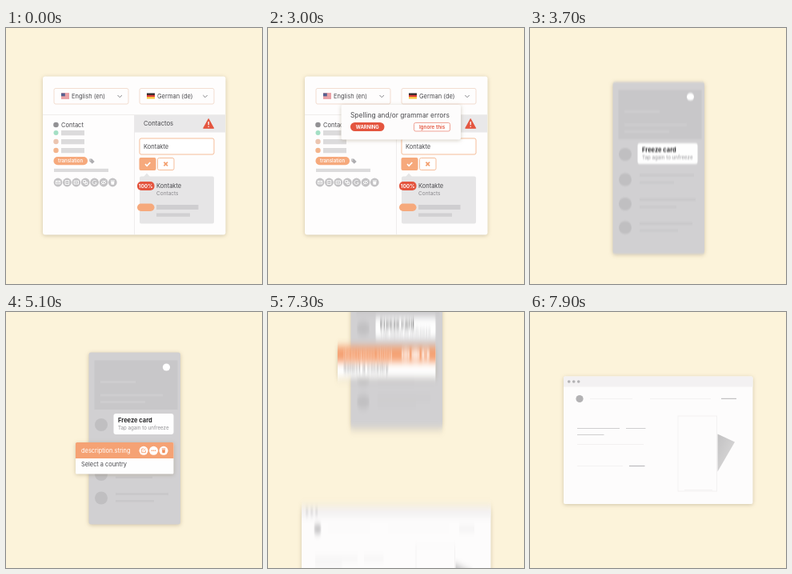
An HTML page that plays this animation: 320 by 320 pixels, repeating every 8 s.

```html
<!DOCTYPE html>
<html lang="en">
<head>
<meta charset="utf-8">
<title>Translation tool tour</title>
<style>
  html, body { margin: 0; width: 100%; height: 100%; overflow: hidden; background: #fcf3da; }
  svg { display: block; width: 100vw; height: 100vh; }
  text { font: 7.5px Inter, sans-serif; fill: #4b4b4f; }
  .shadow { filter: drop-shadow(0 1px 2.5px rgba(110, 90, 50, .3)); }
  .pop { opacity: 0; }
  .bar { fill: #dcdbdc; }
  .box { fill: #fefdfd; stroke: #f2ddd0; }
  .chev { fill: none; stroke: #77777b; stroke-width: .9; }
  .orange { fill: #f6a97c; }
  .red { fill: #e4553f; }
  .mark { fill: none; stroke: #fff; stroke-width: .9; }
  .white { fill: #fff; }
  .phone-dot { fill: #c0bfc1; }
  .phone-bar { fill: #c9c8ca; }
  .line { fill: none; stroke: #cfcecf; }
  .faint { fill: none; stroke: #f3f1f1; }
</style>
</head>
<body>
<svg viewBox="0 0 320 320">
  <defs>
    <filter id="blur" filterUnits="userSpaceOnUse" x="0" y="-40" width="320" height="400" color-interpolation-filters="sRGB">
      <feGaussianBlur id="amount" stdDeviation="0 0"/>
    </filter>
    <linearGradient id="fold" x2="1" y2="1">
      <stop stop-color="#c2c1c2"/><stop offset="1" stop-color="#dedddd"/>
    </linearGradient>
    <g id="ring"><circle r="5.4" fill="#c3c2c4"/></g>
  </defs>
  <rect width="320" height="320" fill="#fcf3da"/>

  <g id="stage"><g id="strip">
    <!-- editor -->
    <g>
      <rect class="shadow" x="46" y="60.5" width="228.5" height="198" rx="3" fill="#fefdfd"/>
      <path d="M46 108.5H274.500M160.500 108.500V258" class="line" style="stroke:#efedec"/>
      <rect x="160.500" y="109" width="113.500" height="21.500" fill="#e9e8e9"/>

      <rect class="box" x="60" y="75.500" width="93" height="19.500" rx="2"/>
      <rect x="69" y="81.500" width="10" height="7" fill="#f4e4e4"/>
      <path d="M69 82H79M69 84H79M69 86H79M69 88H79" stroke="#e0606a"/>
      <rect x="69" y="81.500" width="4.800" height="3.800" fill="#56608f"/>
      <text x="82" y="87.800">English (en)</text>
      <path class="chev" d="M139.500 84l2.700 2.700 2.700-2.700"/>

      <rect class="box" x="167" y="75.500" width="93" height="19.500" rx="2"/>
      <rect x="176" y="81.500" width="10" height="2.500" fill="#2d2929"/>
      <rect x="176" y="83.800" width="10" height="2.400" fill="#dd3a35"/>
      <rect x="176" y="86.100" width="10" height="2.400" fill="#f5c53f"/>
      <text x="189" y="87.800">German (de)</text>
      <path class="chev" d="M246.300 84l2.700 2.700 2.700-2.700"/>

      <circle cx="62.500" cy="121" r="3.300" fill="#929194"/>
      <text x="69" y="123.800">Contact</text>
      <circle cx="62.500" cy="131" r="3" fill="#a4dfc4"/>
      <circle cx="62.500" cy="142" r="3.200" fill="#ebc5b0"/>
      <circle cx="62.500" cy="153" r="3.200" fill="#f3b48c"/>
      <rect class="bar" x="69" y="128" width="29" height="6.300"/>
      <rect class="bar" x="69" y="139" width="29" height="6.300"/>
      <rect class="bar" x="69" y="150" width="29" height="6.300"/>
      <rect class="orange" x="59.500" y="161" width="42.500" height="10.300" rx="5"/>
      <text x="80.700" y="168.300" text-anchor="middle" style="font-size:6.200px;font-weight:500;fill:#fff">translation</text>
      <path d="M104.300 163.500h3l3.400 3.400-2.900 2.900-3.500-3.400z" fill="#aeadb0"/>
      <circle cx="105.700" cy="165" r=".6" class="white"/>
      <rect class="bar" x="60" y="175.800" width="68" height="4.200"/>

      <g transform="translate(65 193)"><use href="#ring"/><path class="mark" d="M-2.700-1.800H2.700V1.900H-2.700zL0 .4 2.700-1.800"/></g>
      <g transform="translate(76.400 193)"><use href="#ring"/><path class="mark" d="M-2.300-2.500H2.300V2.500H-2.300zM-1 0H1"/></g>
      <g transform="translate(87.800 193)"><use href="#ring"/><path class="mark" d="M-2.700-2H2.700V2.100H-2.700zM-1.300 0H1.300"/></g>
      <g transform="translate(99.200 193)"><use href="#ring"/><path class="mark" d="M-2.500-2.500H.5V.5H-2.500zM-.3 -.3H2.500V2.500H-.3z"/></g>
      <g transform="translate(110.600 193)"><use href="#ring"/><path class="mark" d="M2-1.700A2.600 2.600 0 1 0 2.600.6H.5"/></g>
      <g transform="translate(122 193)"><use href="#ring"/><path class="mark" d="M-3 0Q0-3.600 3 0Q0 3.600-3 0M-2.500 2.500L2.500-2.500"/></g>
      <g transform="translate(133.300 193)"><use href="#ring"/><path class="white" d="M-2.200-1.200H2.200L1.700 2.800H-1.700zM-2.600-2.600H2.600V-1.800H-2.600z"/></g>

      <text x="172" y="121.800" style="font-size:7.700px">Contactos</text>
      <path class="red" d="M253.200 113.500L259.700 125.300H246.700z" stroke="#e4553f" stroke-linejoin="round"/>
      <path d="M253.200 117v4.300M253.200 122.700v1.300" stroke="#fff" stroke-width="1.300"/>

      <rect x="167" y="138" width="93" height="20" rx="2" fill="#fff" stroke="#f5bd99"/>
      <text x="172" y="150.800">Kontakte</text>
      <rect class="orange" x="166.500" y="162" width="21" height="16" rx="2"/>
      <path class="mark" d="M174 170.200l2.200 2.200 4.100-4.400" style="stroke-width:1.700"/>
      <rect x="189.500" y="162.500" width="20.500" height="15" rx="2" fill="#fff" stroke="#f5bd99"/>
      <path d="M197.400 167.700l4.600 4.600M202 167.700l-4.600 4.600" stroke="#f3a06f" stroke-width="1.700"/>

      <path d="M172 186l4-4.500 4 4.500z" fill="#e6e5e6"/>
      <rect x="167" y="185.500" width="93" height="59" rx="2" fill="#e6e5e6"/>
      <rect class="red" x="164" y="192" width="21.500" height="11" rx="5"/>
      <text x="174.700" y="199.900" text-anchor="middle" style="font-size:6.600px;font-weight:600;fill:#fff">100%</text>
      <text x="188" y="199.800">Kontakte</text>
      <text x="188" y="209.300" style="font-size:6.500px;fill:#89888c">Contacts</text>
      <rect class="orange" x="164" y="219.500" width="21.500" height="9.500" rx="4.700"/>
      <rect x="188" y="221" width="52.500" height="6" fill="#cfced0"/>
      <rect x="188" y="231.500" width="42" height="4.300" fill="#d1d0d2"/>

      <g class="pop">
        <rect class="shadow" x="91.500" y="96" width="149.500" height="43.500" rx="2" fill="#fdfcfc"/>
        <text x="103" y="112.500" style="font-size:8.400px">Spelling and/or grammar errors</text>
        <rect class="red" x="103" y="118" width="42.500" height="11" rx="5.500"/>
        <text x="124.200" y="125.700" text-anchor="middle" style="font-size:5.900px;font-weight:700;fill:#fff">WARNING</text>
        <rect x="182.500" y="118.500" width="45" height="10.500" rx="2" fill="#fff" stroke="#eb8b7a" stroke-width=".8"/>
        <text x="205" y="126" text-anchor="middle" style="font-size:6.300px;font-weight:600;fill:#e4553f">Ignore this</text>
      </g>
    </g>

    <!-- phone -->
    <g transform="translate(0 300)">
      <rect class="shadow" x="103.500" y="50.500" width="114.500" height="215" rx="3" fill="#d1d0d2"/>
      <rect x="110.500" y="60.500" width="104" height="61.500" fill="#c8c7c9"/>
      <path d="M118 87.500H162M118 104H196M118 112.500H174" stroke="#cecdcf" stroke-width="3"/>
      <circle class="white" cx="200.500" cy="69" r="4.600"/>
      <circle class="phone-dot" cx="119" cy="141" r="8"/>
      <circle class="phone-dot" cx="119" cy="172.500" r="8"/>
      <circle class="phone-dot" cx="119" cy="203" r="8"/>
      <circle class="phone-dot" cx="119" cy="232.500" r="8"/>
      <rect class="phone-bar" x="137" y="165.500" width="68" height="3"/>
      <rect class="phone-bar" x="137" y="175" width="43" height="2.500"/>
      <rect class="phone-bar" x="137" y="196" width="70" height="3"/>
      <rect class="phone-bar" x="137" y="205.500" width="46" height="2.500"/>
      <rect class="phone-bar" x="137" y="226" width="66" height="3"/>
      <rect class="phone-bar" x="137" y="235" width="48" height="2.500"/>
      <rect x="134.500" y="127" width="75" height="26" rx="3" fill="#fefefe"/>
      <text x="140" y="138.300" style="font-weight:700;fill:#252527">Freeze card</text>
      <text x="140" y="147.300" style="font-size:6.200px;fill:#919094">Tap again to unfreeze</text>

      <g class="pop">
        <rect class="shadow" x="87" y="163" width="122.500" height="39.500" rx="1.500" fill="#fefefe"/>
        <path d="M87 183V164.500q0-1.500 1.500-1.500H208q1.500 0 1.500 1.500V183z" fill="#f5a274"/>
        <text x="94" y="175.700" style="font-size:7.450px;fill:#fff">description.string</text>
        <g class="white">
          <circle cx="172" cy="173.300" r="5.500"/>
          <circle cx="184.500" cy="173.300" r="5.500"/>
          <circle cx="197" cy="173.300" r="5.500"/>
        </g>
        <path d="M172.500 171H169.700V175.700H174.400V173M171.800 173.500l2.700-2.800" fill="none" stroke="#f5a274" stroke-width=".9"/>
        <path d="M181.700 173.300h1.400m.7 0h1.400m.7 0h1.400" stroke="#f5a274" stroke-width="1.400"/>
        <path d="M195 172.200h4l-.4 4h-3.200zM194.700 170.600h4.600v.9h-4.600z" fill="#f08e5c"/>
        <text x="94" y="193.300" style="font-size:7.400px">Select a country</text>
      </g>
    </g>

    <!-- browser -->
    <g transform="translate(0 583)">
      <rect class="shadow" x="42" y="80.500" width="236.500" height="159.500" rx="2" fill="#fdfcfc"/>
      <path d="M42 93.500V82.500q0-2 2-2H276.500q2 0 2 2V93.500z" fill="#f3f1f2"/>
      <g fill="#b3b2b4">
        <circle cx="48.700" cy="87" r="1.800"/>
        <circle cx="54.700" cy="87" r="1.800"/>
        <circle cx="60.700" cy="87" r="1.800"/>
        <circle cx="62" cy="108.500" r="4.600"/>
      </g>
      <path class="faint" d="M75 108.500H128M150 108.500H226M59 165.500H142M59 192.500H116M193 222.500H228"/>
      <rect class="faint" x="185" y="130" width="48.500" height="94"/>
      <path class="line" d="M59 145.500H112M120 145.500H144.500M59 153.500H92.500"/>
      <path class="line" d="M239 108.300H258M124 192.500H143.500" style="stroke:#b4b3b6"/>
      <path d="M234.500 152.500L256 162.500 234.500 199.500z" fill="url(#fold)"/>
    </g>
  </g></g>
</svg>
<script>
  const LOOP = 8000, STEP = 100, SLIDE = 1000;
  const $ = id => document.getElementById(id);
  const [warning, tooltip] = document.querySelectorAll('.pop');
  const clamp = x => Math.max(0, Math.min(1, x));
  const inOut = x => x < .5 ? 8 * x ** 4 : 1 - 8 * (1 - x) ** 4;
  const fade = (t, from) => (1 - Math.cos(Math.PI * clamp((t - from) / 600))) / 2;
  const scroll = t =>
    300 * inOut(clamp((t - 2990) / SLIDE)) + 283 * inOut(clamp((t - 6820) / SLIDE));

  function draw(t) {
    const speed = (scroll(t + 5) - scroll(t - 5)) / 10;
    $('strip').setAttribute('transform', `translate(0 ${-scroll(t)})`);
    // vertical motion blur, only while sliding
    if (speed > .02) {
      $('amount').setAttribute('stdDeviation', `0 ${speed * 5}`);
      $('stage').setAttribute('filter', 'url(#blur)');
    } else {
      $('stage').removeAttribute('filter');
    }
    warning.style.opacity = fade(t, 800);
    tooltip.style.opacity = fade(t, 4500);
  }

  const start = performance.now();
  function tick() {
    const t = (performance.now() - start) % LOOP;
    draw(Math.floor(t / STEP) * STEP);
    requestAnimationFrame(tick);
  }
  draw(0);
  requestAnimationFrame(tick);
</script>
</body>
</html>
```
